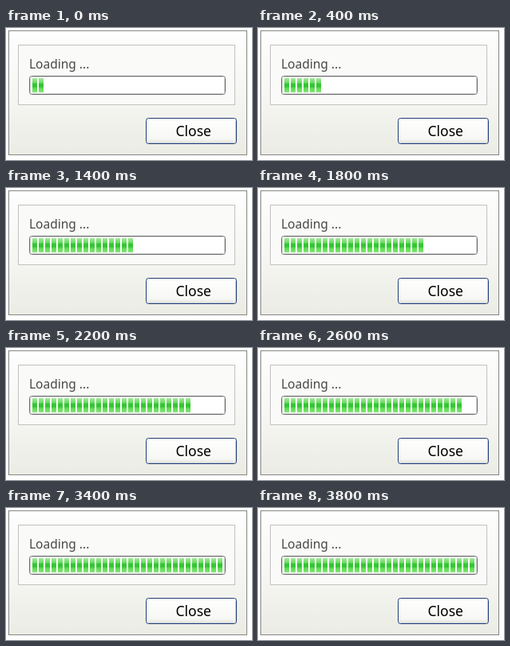
Recreate the animation shown at these times as an HTML page. Size 308x166 px, loop 4 s.

```html
<!DOCTYPE html>
<html lang="en">
<head>
<meta charset="utf-8">
<title>Loading</title>
<style>
  html, body { margin: 0; width: 100%; height: 100%; overflow: hidden; background: #fff; }
  svg { display: block; width: 308px; height: 166px; }
  text { font-family: "Noto Sans", "Open Sans", sans-serif; }
</style>
</head>
<body>
<svg viewBox="0 0 308 166">
  <defs>
    <linearGradient id="face" x2="0" y2="1">
      <stop stop-color="#fefefe"/><stop offset=".5" stop-color="#f6f6f3"/><stop offset="1" stop-color="#ecece5"/>
    </linearGradient>
    <linearGradient id="key" x2="0" y2="1">
      <stop stop-color="#fff"/><stop offset=".8" stop-color="#f7f7f4"/><stop offset="1" stop-color="#e4e3dc"/>
    </linearGradient>
    <linearGradient id="green" x2="0" y2="1">
      <stop stop-color="#a6e8a0"/><stop offset=".3" stop-color="#72dc68"/>
      <stop offset=".42" stop-color="#34c634"/><stop offset=".6" stop-color="#34c634"/>
      <stop offset=".72" stop-color="#62dc54"/><stop offset="1" stop-color="#84e47a"/>
    </linearGradient>
    <pattern id="blocks" x="33" y="63" width="8" height="18" patternUnits="userSpaceOnUse">
      <rect width="6" height="18" fill="url(#green)"/>
    </pattern>
  </defs>
  <rect x="3.5" y="3.5" width="298" height="156" fill="url(#face)" stroke="#858585"/>
  <rect x="15.5" y="21.5" width="271" height="75" fill="#fafaf9" stroke="#c4c1bf"/>
  <text x="29" y="51" font-size="15.5" textLength="" fill="#484848">Loading ...</text>
  <rect x="29.5" y="60.5" width="245" height="23" rx="3" fill="#fff" stroke="#6b6b6b"/>
  <path d="M31 61.5H273M30.5 62V82M31 82.5H273M273.5 62V82" fill="none" stroke="#d4d4d4"/>
  <rect id="bar" x="33" y="63" width="16" height="18" fill="url(#blocks)"/>
  <rect x="175.5" y="113.5" width="113" height="32" rx="3" fill="url(#key)" stroke="#1d3f78"/>
  <path d="M177 144.5H287M287.5 116V143" fill="none" stroke="#c9ccd4"/>
  <text x="212.5" y="136" font-size="17.5" fill="#000">Close</text>
</svg>
<script>
  const bar = document.getElementById("bar");
  const keys = [[0, 2], [7, 16], [9, 22], [13, 28], [15, 30], [20, 30]];

  // Number of filled blocks at a 200 ms step
  function blocksAt(step) {
    const i = keys.findIndex(k => k[0] > step);
    const [s0, n0] = keys[i - 1], [s1, n1] = keys[i];
    return Math.round(n0 + (n1 - n0) * (step - s0) / (s1 - s0));
  }

  function draw() {
    const step = Math.floor(performance.now() % 4000 / 200);
    bar.setAttribute("width", 8 * blocksAt(step));
    requestAnimationFrame(draw);
  }
  draw();
</script>
</body>
</html>
```
